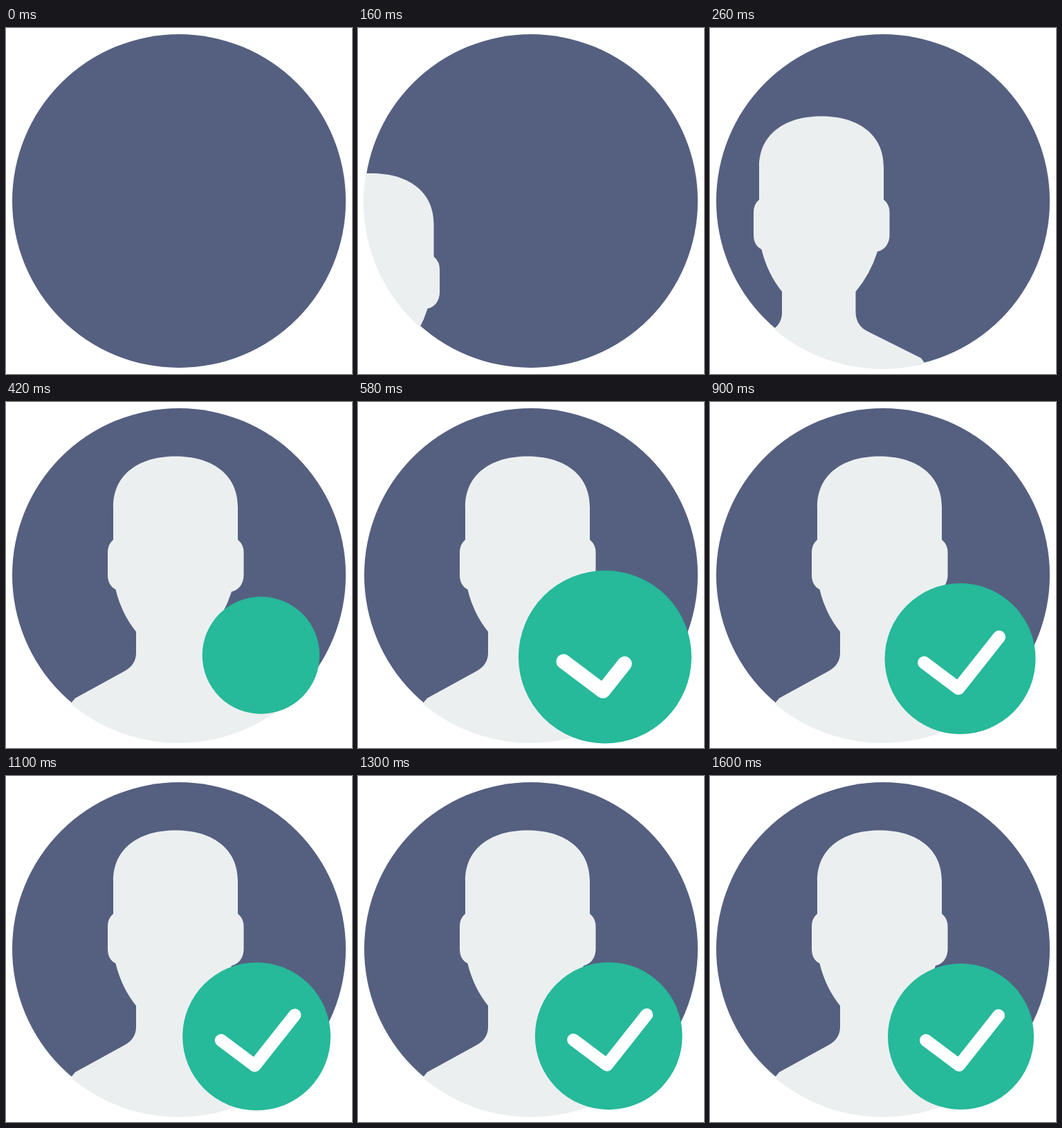
Animation of 500 by 500 pixels, one loop 1620 ms. Source, as an HTML page with a canvas:

```html
<!DOCTYPE html>
<html lang="en">
<head>
<meta charset="utf-8">
<title>Profile verified</title>
<style>
html, body { margin: 0; width: 100%; height: 100%; overflow: hidden; background: #fff; }
canvas { display: block; width: 500px; height: 500px; }
</style>
</head>
<body>
<canvas id="stage" width="500" height="500"></canvas>
<script>
const ctx = document.getElementById('stage').getContext('2d');
const LOOP = 1620, STEP = 20;
const BLUE = '#556080', PALE = '#ebeff0', GREEN = '#26b99a';

const person = new Path2D(`M155 152 C155 103 194 78.500 245 78.500 S335 103 335 152
  V199 Q343.500 206 343.500 217 V250 C343.500 263 336 272 326 274
  Q316 306 294.500 332 V361 C294.500 375 301 384 312 389.500
  L389 428 L394 435 L420 500 H70 L95 434 L100 428 L172 388.500
  C182 383 188 374 188 363 V332 Q167 306 158.500 271
  C151 267 147 260 147 250 V217 Q147 206 155 199 Z`);

// [time, value] keys for the badge after its pop
const scaleKeys = [[540, 1.222], [560, 1.213], [580, 1.185], [700, 1.1],
  [900, 1.033], [1100, 1.014], [1300, 1.009], [1600, 1]];
const heightKeys = [[340, 372], [420, 366], [520, 360], [560, 361], [580, 368.5],
  [600, 374.5], [625, 376.5], [700, 372], [900, 371], [1120, 376.5],
  [1300, 375.7], [1600, 376.5]];

const clamp = x => Math.min(1, Math.max(0, x));
const progress = (t, start, end) => clamp((t - start) / (end - start));

function slopeAt(keys, i) {
  if (i === 0 || i === keys.length - 1) return 0;
  const [a, b, c] = keys.slice(i - 1, i + 2);
  const before = (b[1] - a[1]) / (b[0] - a[0]);
  const after = (c[1] - b[1]) / (c[0] - b[0]);
  return before * after <= 0 ? 0 : 2 * before * after / (before + after);
}

// Smooth interpolation without overshoot between keys
function sample(keys, t) {
  if (t <= keys[0][0]) return keys[0][1];
  const i = keys.findIndex(k => k[0] > t) - 1;
  if (i < 0) return keys[keys.length - 1][1];
  const [t0, a] = keys[i], [t1, b] = keys[i + 1];
  const h = t1 - t0, u = (t - t0) / h;
  return a + (b - a) * u * u * (3 - 2 * u)
    + h * u * (1 - u) * (slopeAt(keys, i) * (1 - u) - slopeAt(keys, i + 1) * u);
}

function badgeScale(t) {
  if (t >= 540) return sample(scaleKeys, t);
  return 1.222 * (1 - (1 - progress(t, 335, 540)) ** 2);
}

function disc(x, y, r, color) {
  ctx.beginPath();
  ctx.arc(x, y, r, 0, Math.PI * 2);
  ctx.fillStyle = color;
  ctx.fill();
}

function drawPerson(t) {
  const away = 2 + 2 * Math.cos(Math.PI * progress(t, 20, 380));
  ctx.save();
  ctx.beginPath();
  ctx.arc(249.5, 251.5, 241.5, 0, Math.PI * 2);
  ctx.clip();
  ctx.translate(-84 * away, 49 * away);
  ctx.fillStyle = PALE;
  ctx.fill(person);
  ctx.restore();
}

function drawCheck(p) {
  const short = 60, long = 92, length = p * (short + long);
  const first = clamp(length / short), second = clamp((length - short) / long);
  ctx.beginPath();
  ctx.moveTo(-50.5, 5.5);
  ctx.lineTo(-50.5 + 48 * first, 5.5 + 36 * first);
  if (second > 0) ctx.lineTo(-2.5 + 57 * second, 41.5 - 72 * second);
  ctx.lineWidth = 18;
  ctx.lineCap = ctx.lineJoin = 'round';
  ctx.strokeStyle = '#fff';
  ctx.stroke();
}

function drawBadge(t) {
  const scale = badgeScale(t);
  if (scale <= 0) return;
  ctx.save();
  ctx.translate(362.5 - 30 * (scale - 1), sample(heightKeys, t));
  ctx.scale(scale, scale);
  disc(0, 0, 105.5, GREEN);
  const drawn = progress(t, 460, 638);
  if (drawn > 0) drawCheck(drawn);
  ctx.restore();
}

function render(now) {
  const t = Math.floor((now % LOOP) / STEP) * STEP;
  ctx.fillStyle = '#fff';
  ctx.fillRect(0, 0, 500, 500);
  disc(250, 250, 241, BLUE);
  if (t >= 40) drawPerson(t);
  drawBadge(t);
}

const start = performance.now();
function tick() {
  render(performance.now() - start);
  requestAnimationFrame(tick);
}
tick();
</script>
</body>
</html>
```
